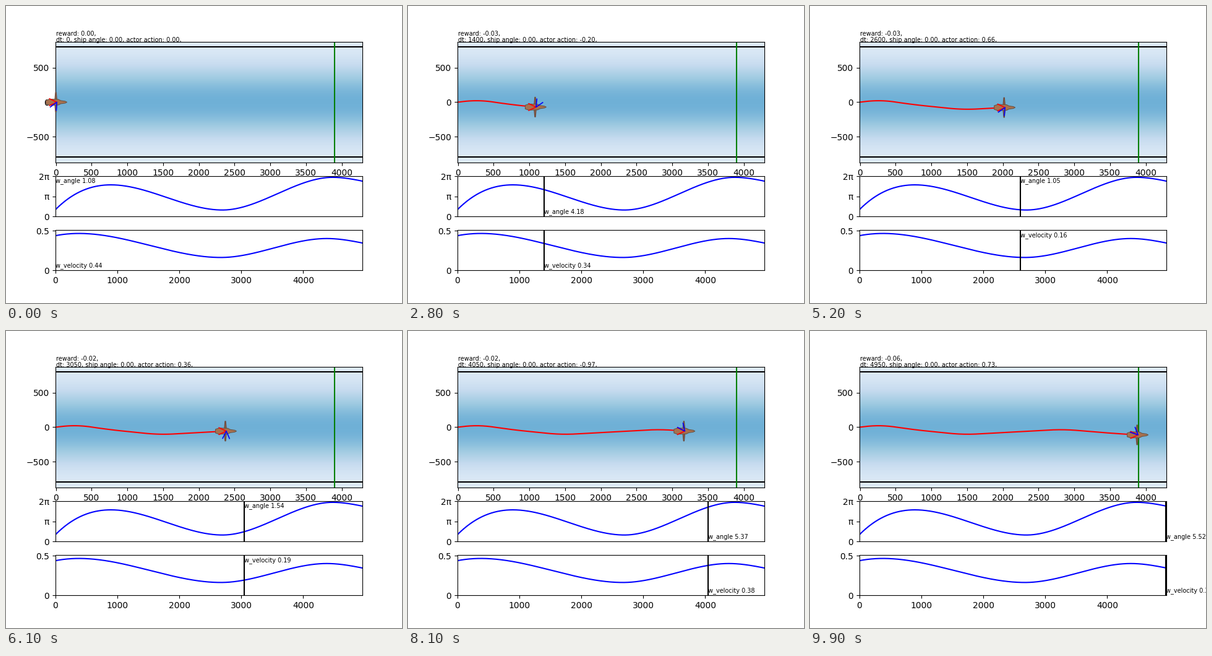
A matplotlib script for the animation above (10 s loop, 640x480 px).

```python
import numpy as np
import matplotlib.pyplot as plt
from matplotlib.animation import FuncAnimation

FRAMES, STEP = 100, 50
X_MIN, X_MAX, Y_MAX = -5, 4290, 880
T_MAX, V_MAX = 4955, 0.51


def ease(keys, t):
    """Smoothstep from one turning point to the next."""
    ts, vs = np.array(keys, float).T
    i = np.clip(np.searchsorted(ts, t) - 1, 0, len(ts) - 2)
    s = (t - ts[i]) / (ts[i + 1] - ts[i])
    return vs[i] + (vs[i + 1] - vs[i]) * s * s * (3 - 2 * s)


def wind_angle(t):
    return ease([(894, 4.93), (2695, 1.015), (4475, 6.1), (5700, 4.366)], t)


def wind_speed(t):
    return ease([(380, 0.466), (2670, 0.1625), (4380, 0.402), (5700, 0.262)], t)


def action(t):
    return ease([(0, 0), (850, 0.24), (1950, -0.63), (2600, 0.66), (3550, 0),
                 (4050, -0.97), (4950, 0.73)], t)


def ship_x(t):
    return 0.768 * t + 3.2e-6 * t * t


def ship_y(x):
    """Straight legs between waypoints, rounded by a moving average."""
    xs, ys = zip((-280, -35), (280, 35), (750, -36), (1450, -110),
                 (2850, -30), (3500, -87), (4200, -133))
    return np.mean([np.interp(x + d, xs, ys) for d in np.linspace(-200, 200, 41)], axis=0)


fig, (sea, ang, vel) = plt.subplots(3, 1, figsize=(6.4, 4.8), dpi=100,
                                    gridspec_kw={"height_ratios": [3, 1, 1]})

# River with its banks and the finish line
rows = np.linspace(-1, 1, 400)
sea.imshow((0.31 + 0.18 * np.cos(np.pi * rows))[:, None], cmap="Blues", vmin=0, vmax=1,
           extent=(X_MIN, X_MAX, -Y_MAX, Y_MAX), aspect="auto", origin="lower")
for bank in (-800, 800):
    sea.axhline(bank, color="black")
sea.axvline(3900, color="green")
sea.set(xlim=(X_MIN, X_MAX), ylim=(-Y_MAX, Y_MAX), xticks=range(0, 4001, 500),
        yticks=(-500, 0, 500))

# Wind plots
times = np.linspace(0, T_MAX, 500)
ang.plot(times, wind_angle(times), "b")
ang.set(xlim=(0, T_MAX), ylim=(0, 2 * np.pi), xticks=[])
ang.set_yticks([0, np.pi, 2 * np.pi], ["0", "π", "2π"])
vel.plot(times, wind_speed(times), "b")
vel.set(xlim=(0, T_MAX), ylim=(0, V_MAX), xticks=range(0, 4001, 1000))
vel.set_yticks([0, 0.5], ["0", "0.5"])

cursors = [ax.axvline(0, color="black") for ax in (ang, vel)]
ang_text = ang.text(0, 0, "", fontsize=7)
vel_text = vel.text(0, 0, "", fontsize=7)
info = sea.text(0, Y_MAX, "", fontsize=7, linespacing=1)

# Ship parts, in pixels around its centre
PX = np.array([(X_MAX - X_MIN) / 496, 2 * Y_MAX / 195.67])


def mirrored(half):
    return np.array(half + [(x, -y) for x, y in half[::-1]])


HULL = mirrored([(18, 0), (15, 1.5), (8, 2.5), (4, 4.5), (-10, 5), (-16, 3)])
WINGS = mirrored([(-1.8, 3), (-0.6, 16), (0.6, 16), (1.8, 3)])


def arrow_head(angle):
    arms = angle + np.pi + np.radians([-25, 25])
    tips = 13 * np.column_stack([np.cos(arms), np.sin(arms)])
    return np.array([tips[0], (0, 0), tips[1]]) + (1.5, 0)


def ship_line(color, z):
    return sea.plot([], [], color, lw=1.2, clip_on=False, zorder=z)[0]


trail, = sea.plot([], [], "r")
# Wing halves run mirror-wise, so order the outline around the centre
WINGS = WINGS[np.argsort(np.arctan2(WINGS[:, 1], WINGS[:, 0]))]
parts = [sea.fill(*shape.T, fc=fc, ec=ec, lw=0.8, clip_on=False, zorder=4)[0]
         for shape, fc, ec in ((WINGS, "#8a5a44", "#6b4a3c"),
                               (HULL, "#a8714f", "#6a5546"))]
heading, wind = ship_line("r", 5), ship_line("b", 6)


def update(i):
    t = i * STEP
    x = ship_x(t)
    y = ship_y(x)
    a, v = wind_angle(t), wind_speed(t)
    pos = np.array([x, y])

    path = np.linspace(0, x, 2 * i + 2)
    trail.set_data(path, ship_y(path))
    for part, shape in zip(parts, (WINGS, HULL)):
        part.set_xy(pos + shape * PX)
    heading.set_data(*(pos + arrow_head(0) * PX).T)
    wind.set_data(*(pos + arrow_head(a) * PX).T)

    reward = round(-4.855e-5 * abs(y) ** 1.5, 2) + 0.0
    info.set_text(f"reward: {reward:.2f},\n"
                  f"dt: {t}, ship angle: 0.00, actor action: {action(t):.2f},")
    for line in cursors:
        line.set_xdata([t, t])
        line.set_visible(i > 0)
    ang_text.set_position((t, 0.5 if a > np.pi else 5.3))
    ang_text.set_text(f"w_angle {a:.2f}")
    vel_text.set_position((t, 0.04 if v > 0.25 else 0.425))
    vel_text.set_text(f"w_velocity {v:.2f}")


anim = FuncAnimation(fig, update, frames=FRAMES, interval=100, repeat=True,
                     repeat_delay=0, blit=False)
plt.show()
```
